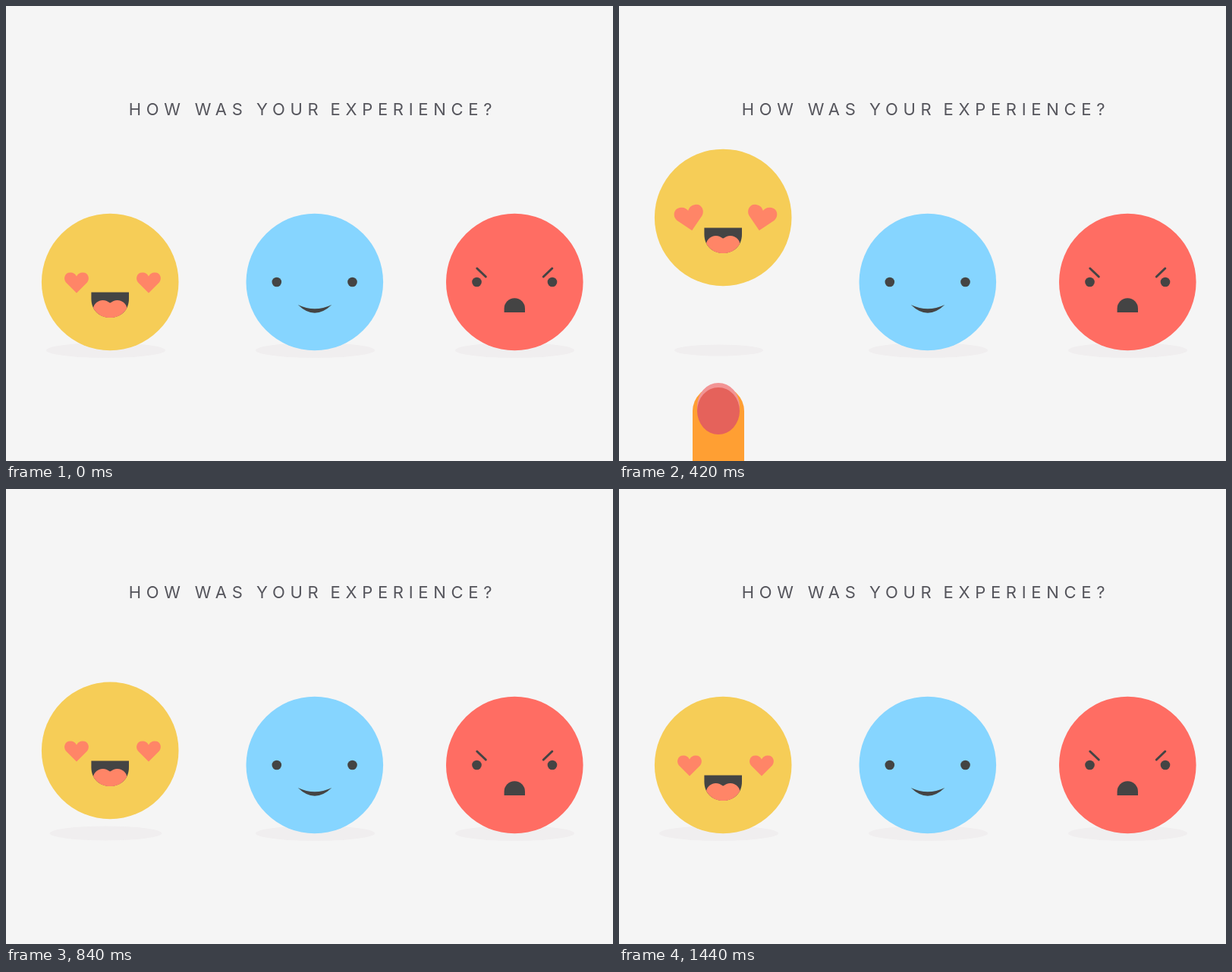
These frames come from a looping animation (800x600 px, 3600 ms). An HTML page:

```html
<!DOCTYPE html>
<html lang="en">
<head>
<meta charset="utf-8">
<title>How was your experience?</title>
<style>
  html, body { margin: 0; width: 100%; height: 100%; overflow: hidden; background: #f5f5f5; }
  svg { display: block; width: 100vw; height: 100vh; }
  text { font: 400 22px Inter, "Open Sans", sans-serif; letter-spacing: 6.7px; fill: #55555c; }
  .shadow { fill: #f0eeef; }
  .dark { fill: #444; }
  .coral { fill: #ff8567; }
  .brow { stroke: #444; stroke-width: 3; stroke-linecap: round; }
</style>
</head>
<body>
<svg viewBox="0 0 800 600">
  <defs>
    <path id="heart" d="M0 14 L-14 0 C-18 -5 -15.5 -13 -8.5 -13 C-4 -13 -1.5 -11 0 -8 C1.5 -11 4 -13 8.5 -13 C15.5 -13 18 -5 14 0 Z"/>
    <path id="grin" d="M-24.8 13.5 H24.8 V22 C24.8 38 13 47 0 47 C-13 47 -24.8 38 -24.8 22 Z"/>
    <clipPath id="inMouth"><use href="#grin"/></clipPath>
  </defs>

  <text y="143.5"><tspan x="161.8">HOW</tspan><tspan x="248.7">WAS</tspan><tspan x="330">YOUR</tspan><tspan x="427.5">EXPERIENCE?</tspan></text>

  <ellipse class="shadow" id="shadow" cx="131.5" cy="454"/>
  <ellipse class="shadow" cx="407.5" cy="454" rx="78.5" ry="10"/>
  <ellipse class="shadow" cx="670.5" cy="454" rx="78.5" ry="10"/>

  <g id="happy">
    <circle r="90.3" fill="#f6cd57"/>
    <use class="coral" id="heartL" href="#heart"/>
    <use class="coral" id="heartR" href="#heart"/>
    <use class="dark" href="#grin"/>
    <g class="coral" clip-path="url(#inMouth)">
      <ellipse cx="-9.5" cy="37" rx="13" ry="13"/>
      <ellipse cx="9.5" cy="37" rx="13" ry="13"/>
      <rect x="-14" y="27.5" width="28" height="22"/>
    </g>
  </g>

  <g transform="translate(406.8 364)">
    <circle r="90.3" fill="#86d5ff"/>
    <g class="dark">
      <circle cx="-50" r="6.3"/>
      <circle cx="49.7" r="6.3"/>
      <path d="M-22 30 Q0 40.5 22.5 30 Q0 51.5 -22 30 Z"/>
    </g>
  </g>

  <g transform="translate(670.3 364)">
    <circle r="90.3" fill="#ff6d63"/>
    <g class="dark">
      <circle cx="-49.8" r="6.3"/>
      <circle cx="49.7" r="6.3"/>
      <path d="M-13.7 40 V35 A13.7 13.7 0 0 1 13.7 35 V40 Z"/>
    </g>
    <path class="brow" d="M-49.5 -18 L-38 -7 M49.5 -18 L38 -7"/>
  </g>

  <g id="finger">
    <path fill="#ff9f33" d="M-34 400 V0 A34 33 0 0 1 34 0 V400 Z"/>
    <ellipse cy="-6" rx="28" ry="31" fill="#f29595"/>
    <ellipse rx="28" ry="31" fill="#e5625b"/>
  </g>
</svg>

<script>
const LOOP = 3600, STEP = 30;
const JUMP = 305, PEAK = 365, FALL = 235, TOP = 90;
const BOUNCES = [34, 10, 1.5];

const $ = id => document.getElementById(id);
const part = (t, from, to) => Math.min(1, Math.max(0, (t - from) / (to - from)));
const smooth = u => u * u * (3 - 2 * u);

// Height of the happy face above the ground.
function height(t) {
  if (t < PEAK) return TOP * (1 - (1 - part(t, JUMP, PEAK)) ** 2);
  const g = TOP / FALL ** 2;
  let land = PEAK + FALL;
  if (t < land) return TOP - g * (t - PEAK) ** 2;
  for (const h of BOUNCES) {
    const half = Math.sqrt(h / g);
    if (t < land + 2 * half) return h - g * (t - land - half) ** 2;
    land += 2 * half;
  }
  return 0;
}

function draw(t) {
  const h = height(t);
  $("happy").setAttribute("transform", `translate(137.2 ${364 - h})`);
  $("shadow").setAttribute("rx", 78.5 - 0.235 * h);
  $("shadow").setAttribute("ry", 10 - 0.029 * h);

  // The hearts swell and tilt outwards during the jump.
  const p = part(t, 320, 790);
  const swell = 1 + 0.34 * Math.sin(Math.PI * p);
  const tilt = 11 * Math.sin(Math.PI * Math.sqrt(p));
  $("heartL").setAttribute("transform", `translate(-44.2 .5) rotate(${-tilt}) scale(${swell})`);
  $("heartR").setAttribute("transform", `translate(50.8 .5) rotate(${tilt}) scale(${swell})`);

  const y = 652 - 205 * (smooth(part(t, 0, 260)) - smooth(part(t, 300, 567)));
  const press = 1 - 0.15 * (smooth(part(t, 230, 300)) - smooth(part(t, 300, 400)));
  $("finger").setAttribute("transform", `translate(131 ${y}) scale(${press})`);
}

const start = performance.now();
function tick() {
  const t = (performance.now() - start) % LOOP;
  draw(Math.floor(t / STEP) * STEP);
  requestAnimationFrame(tick);
}
tick();
</script>
</body>
</html>
```
